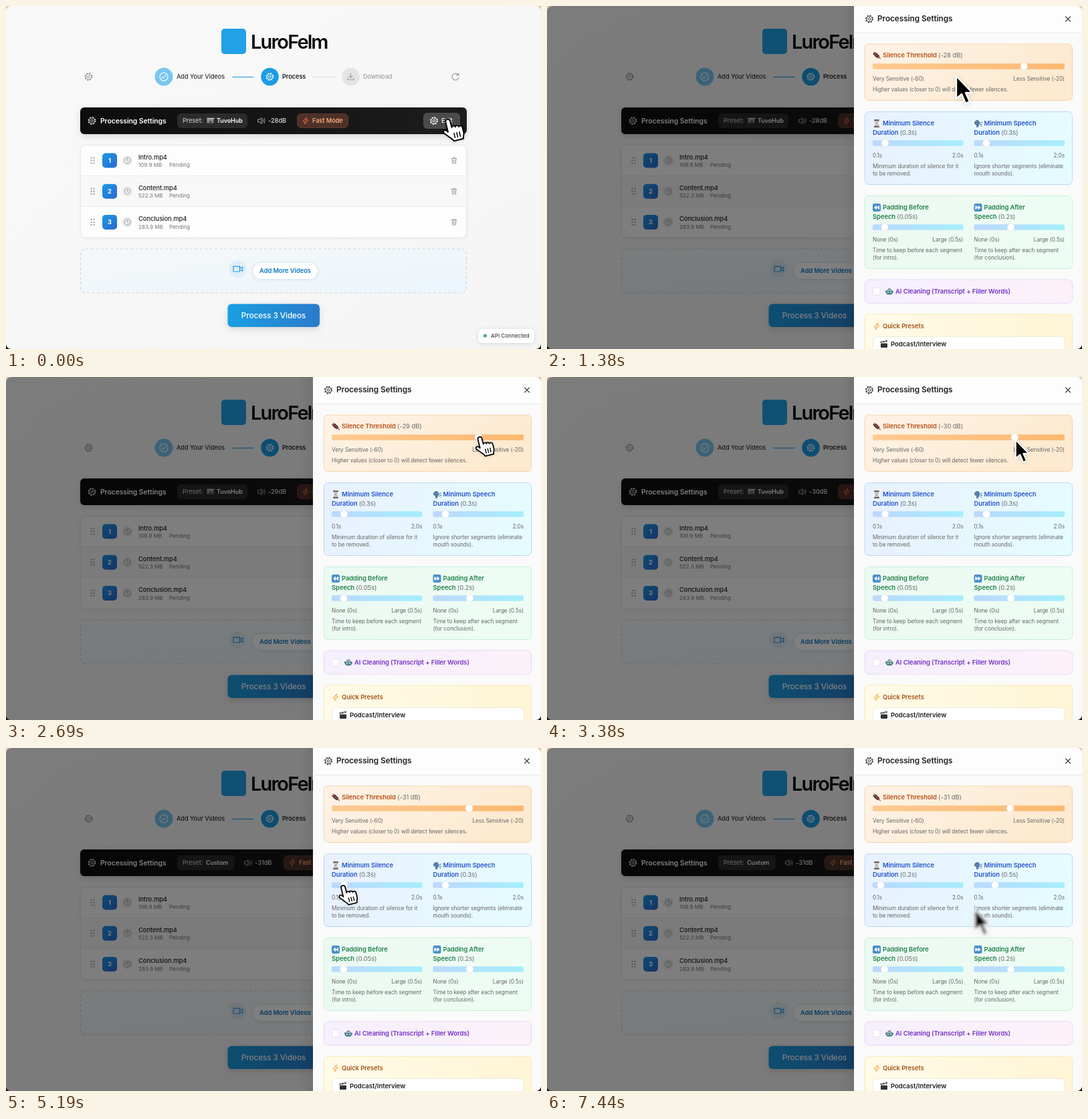
An HTML page that plays this animation: 800x514 px, repeating every 7.5 s.

```html
<!DOCTYPE html>
<html lang="en">
<head>
<meta charset="utf-8">
<title>Processing settings demo</title>
<style>
html, body { margin: 0; height: 100%; overflow: hidden; background: linear-gradient(#dfc6a4, #1b1512); }
svg { display: block; width: 800px; height: 514px; }
text { font-family: Inter, "Open Sans", sans-serif; letter-spacing: -.008em; white-space: pre; }
.brand { letter-spacing: -.065em; }
.faint { filter: drop-shadow(0 1px 2px #0001); }
.soft { filter: drop-shadow(0 1px 3px #0002); }
.lift { filter: drop-shadow(0 3px 5px #0002); }
</style>
</head>
<body>
<svg id="stage" viewBox="0 0 800 514"></svg>
<script>
const LOOP = 7500, STEP = 62.5;

// ---------- drawing helpers (text y is the visual middle of the line) ----------
const text = (x, y, size, weight, fill, str, anchor = 'start', extra = '') =>
  `<text x="${x}" y="${y + size * .36}" font-size="${size}" font-weight="${weight}" fill="${fill}" text-anchor="${anchor}" ${extra}>${str}</text>`;
const rect = (x, y, w, h, r, fill, extra = '') =>
  `<rect x="${x}" y="${y}" width="${w}" height="${h}" rx="${r}" fill="${fill}" ${extra}/>`;
const circle = (x, y, r, fill, extra = '') => `<circle cx="${x}" cy="${y}" r="${r}" fill="${fill}" ${extra}/>`;
const path = (d, stroke, width = 1, fill = 'none') =>
  `<path d="${d}" stroke="${stroke}" stroke-width="${width}" fill="${fill}" stroke-linecap="round" stroke-linejoin="round"/>`;
const at = (x, y, body, id = '') => `<g ${id && `id="${id}"`} transform="translate(${x} ${y})">${body}</g>`;
const grad = (id, a, b, x2 = 1, y2 = 0) =>
  `<linearGradient id="${id}" x2="${x2}" y2="${y2}"><stop stop-color="${a}"/><stop offset="1" stop-color="${b}"/></linearGradient>`;

// ---------- icons, centred on 0,0 ----------
const gear = c => circle(0, 0, 4.3, 'none', `stroke="${c}"`) + circle(0, 0, 1.8, 'none', `stroke="${c}"`) +
  circle(0, 0, 5.2, 'none', `stroke="${c}" stroke-width="1.5" stroke-dasharray="2.04"`);
const bolt = c => path('M1.5 -5L-4 1H-.5L-1.5 5L4 -1H.5Z', c);
const speaker = c => path('M-5 -2H-3L0 -4.5V4.5L-3 2H-5Z M2 -2Q3.5 0 2 2 M4 -3.8Q6.5 0 4 3.8', c);
const clock = circle(0, 0, 8, '#eeeeee') + circle(0, 0, 4.4, 'none', 'stroke="#9a9a9a"') + path('M0 -2.5V0L1.6 1.2', '#9a9a9a');
const trash = path('M-4 -3H4M-1.5 -3V-4.3H1.5V-3M-3 -3L-2.5 4.3H2.5L3 -3M-1 -1V2.5M1 -1V2.5', '#999', .9);
const mute = path('M-5 -2.5L-1 -4L4 1L2 4Q-3 2 -5 -2.5Z', '#4d3030', 1, '#694040') + path('M-4 -5L5.5 5', '#8f4a48', 1.1);
const hourglass = path('M-2.6 -4Q-2.6 -1 0 0Q2.6 1 2.6 4H-2.6Q-2.6 1 0 0Q2.6 -1 2.6 -4Z', '#8f8a86', .8, '#ddd0b4') +
  path('M-3.4 -5H3.4M-3.4 5H3.4', '#4e3c38', 1.4);
const talker = path('M-2 5V2Q-6 1 -5 -2Q-3 -6 1 -4L3 0L1.5 1V3H0V5Z', '#4b6a94', .8, '#5b80ad') +
  path('M4 -1L6 -2M4 1.5H6M4 3L5.5 4.5', '#4b6a94');
const skip = dir => rect(-6, -6, 12, 12, 2.5, '#4b8fc9') +
  `<path transform="scale(${dir} 1)" d="M-4 -3.2L0 0L-4 3.2ZM0 -3.2L4 0L0 3.2Z" fill="#fff"/>`;
const robot = path('M-3 -1.5Q0 -7 3 -1.5', '#65807f', 1, '#8fb0b0') + path('M-5.5 -.5H5.5Q5 4.5 2 4.5H-2Q-5 4.5 -5.5 -.5Z', '#3c737c', .8, '#4d8a93') +
  circle(-2, 1.5, .9, '#e8f4f4') + circle(2, 1.5, .9, '#e8f4f4');
const clapper = rect(-5, -1.5, 10, 6.5, 1, '#333') + path('M-4.6 -3.3L4 -5', '#333', 2) + path('M-3 -3.6L-2 -4M1 -4.4L2 -4.8', '#eee', 1.2);
const tv = path('M-5 -3H4V3H-5Z', '#777', 1, '#8d8d8d') + path('M-5 -3.5H5', '#c9c9c9', 1.5) + rect(-2, 0, 4, 4, 1, '#555');

// ---------- main page ----------
const fileRow = (name, size, i) => at(0, 231.5 + i * 46.2,
  [-4, 0, 4].map(y => circle(127.5, y, 1.1, '#999') + circle(131.5, y, 1.1, '#999')).join('') +
  rect(144, -11, 22, 22, 5, 'url(#badge)') + text(155, 0, 9.3, 700, '#fff', i + 1, 'middle') +
  at(181.5, 0, clock) + text(198, -5.2, 9.4, 500, '#222', name) +
  text(198, 6.8, 8.2, 400, '#777', size) + text(244, 6.8, 8.1, 400, '#777', 'Pending') + at(670, 0, trash));

const page = rect(0, 0, 800, 514, 0, 'url(#page)') +
  rect(322, 34, 37, 38, 5, '#20a1e8') +
  text(366, 53.5, 29, 600, '#0b0b0b', 'LuroFelm', 'start', 'class="brand"') +
  at(123.5, 106, gear('#909090')) +
  circle(236, 106, 13.5, '#78c6f0') + circle(236, 106, 6, 'none', 'stroke="#fff" stroke-width="1.1"') + path('M233.5 106.3L235.3 108L238.7 104', '#fff', 1.1) +
  text(255, 106, 9.2, 500, '#333', 'Add Your Videos') + path('M339 106.5H370', '#4fb1e6', 1.3) +
  circle(394.5, 106, 13.3, '#1b9ce3') + at(394.5, 106, gear('#fff')) + text(413, 106, 9.2, 600, '#222', 'Process') +
  path('M460 106.5H491', '#dcdcdc', 1.2) + circle(515.5, 106, 13.3, '#e4e4e6') +
  path('M515.5 101V107.5M512.8 105L515.5 107.7L518.2 105M510.7 108V110.5H520.3V108', '#a0a0a0', 1.1) +
  text(534, 106, 9.2, 500, '#a0a0a0', 'Download') +
  path('M676.4 103.5A5 5 0 1 0 677 107M676.8 100.7V103.8H673.6', '#8c8c8c', 1.1) +

  rect(111, 152, 578, 40, 6, 'url(#bar)', 'class="lift"') + at(128.5, 172, gear('#d8d8d8')) +
  text(141, 172, 10.4, 600, '#fff', 'Processing Settings') +
  rect(256, 161, 105, 22, 6, '#2b2b2b', 'id="pill"') + text(264, 172, 9.2, 500, '#c2c2c2', 'Preset:') +
  at(306, 172, tv, 'tv') + text(315, 172, 9, 600, '#fff', 'TuvoHub', 'start', 'id="preset"') +
  at(0, 0, at(382, 172, speaker('#aaa')) + text(392, 172, 9.3, 500, '#dcdcdc', '', 'start', 'id="barDb"') +
    rect(435.5, 161.5, 76, 21, 6, '#4d3129', 'stroke="#5a372d"') + at(448, 172, bolt('#f2693c')) +
    text(458, 172, 9.2, 600, '#f7a87c', 'Fast Mode'), 'barEnd') +
  rect(624, 160, 55, 24, 6, '#4b4b4b') + at(640, 172, gear('#fff')) + text(651, 172, 9.3, 500, '#fff', 'Edit') +

  rect(111.5, 208.5, 577, 138.5, 8, '#fdfdfd', 'stroke="#e9e9e9" class="faint"') + rect(112, 254.5, 576, 46, 0, '#f8f8f8') +
  path('M112 254.5H688M112 300.5H688', '#eaeaea') +
  [['Intro.mp4', '109.9 MB'], ['Content.mp4', '522.3 MB'], ['Conclusion.mp4', '283.9 MB']].map((f, i) => fileRow(...f, i)).join('') +

  rect(111.5, 364, 577, 66, 8, 'url(#drop)', 'stroke="#ccd6dc" stroke-width="1.2" stroke-dasharray="4 3.4"') +
  circle(346.5, 394, 13, '#dfeef8') + path('M340 390.2H349.5V398H340ZM349.5 393.2L353.8 391V397.2L349.5 395', '#2a9cdc', 1.2) +
  rect(368.5, 384.5, 98, 25, 12.5, '#fff', 'stroke="#dbe8f1" class="faint"') + text(417.5, 397, 9.4, 600, '#0b79c0', 'Add More Videos', 'middle') +
  rect(331.5, 446.5, 137.5, 34.5, 6, 'url(#action)', 'class="lift"') + text(400, 463.7, 11.75, 500, '#fff', 'Process 3 Videos', 'middle') +
  rect(706, 484, 84, 21, 6, '#fff', 'class="soft"') + circle(716.5, 494, 2.6, '#45b06f') + text(725, 494, 8.2, 500, '#444', 'API Connected');

// ---------- settings panel ----------
const L = 487, R = 638.5, W = 135.5;
const thumb = (x, y, id) => circle(x, y, 5.4, '#fff', `stroke="#e3e0dc" stroke-width=".6" ${id ? `id="${id}"` : ''}`);
const section = (y, h, fill, border) => rect(475.5, y, 310, h, 6, `url(#${fill})`, `stroke="${border}"`);
const small = (x, y, str, anchor) => text(x, y, 8.25, 400, '#666', str, anchor);
const heading = (x, y, color, title, id, value) =>
  text(x, y, 9.45, 600, color, `${title} <tspan font-weight="400" fill="#6b6b6b" id="${id}">${value}</tspan>`);

function control(x, y, color, icon, title, word, id, value, pos, low, high, note) {
  return at(x + 6, y, icon) + text(x + 15, y, 9.45, 600, color, title) + heading(x, y + 13.3, color, word, id, value) +
    rect(x, y + 25.2, W, 8.5, 2, 'url(#track)') + thumb(pos, y + 29.5, id + 'Thumb') +
    small(x, y + 48, low) + small(x + W, y + 48, high, 'end') +
    small(x, y + 64, note[0]) + small(x, y + 75, note[1]);
}

const panel = rect(439, 0, 20, 514, 0, 'url(#edge)') + rect(459, 0, 345, 514, 0, '#fafafa') +
  rect(459, 0, 345, 40, 0, '#fdfdfd') + path('M459 40.5H804', '#e8e8e8') +
  at(482, 19.5, gear('#333')) + text(494, 19, 11.85, 600, '#222', 'Processing Settings') + path('M775.5 16L782.5 23M782.5 16L775.5 23', '#444', 1.2) +

  section(57, 84.5, 'orange', '#f7d3a8') + at(493, 74, mute) + heading(502, 74, '#b9501a', 'Silence Threshold', 'db', '') +
  rect(L, 86.2, 287, 8.5, 2, 'url(#heat)') + thumb(713, 90.4, 'dbThumb') +
  small(L, 109, 'Very Sensitive (-60)') + small(774, 109, 'Less Sensitive (-20)', 'end') +
  small(L, 125, 'Higher values (closer to 0) will detect fewer silences.') +

  section(158.5, 109, 'blue', '#b9d7f6') +
  control(L, 176, '#2453c9', hourglass, 'Minimum Silence', 'Duration', 'sil', '', 505, '0.1s', '2.0s', ['Minimum duration of silence for it', 'to be removed.']) +
  control(R, 176, '#2453c9', talker, 'Minimum Speech', 'Duration', 'spk', '', 657, '0.1s', '2.0s', ['Ignore shorter segments (eliminate', 'mouth sounds).']) +

  section(284.5, 109, 'green', '#c6f0d5') +
  control(L, 302, '#23814a', skip(-1), 'Padding Before', 'Speech', 'before', '(0.05s)', 504.9, 'None (0s)', 'Large (0.5s)', ['Time to keep before each segment', '(for intro).']) +
  control(R, 302, '#23814a', skip(1), 'Padding After', 'Speech', 'after', '(0.2s)', 693.6, 'None (0s)', 'Large (0.5s)', ['Time to keep after each segment', '(for conclusion).']) +

  section(410, 35.5, 'purple', '#e9d6f6') + rect(487.5, 422.5, 10.5, 10.5, 2, '#fff', 'stroke="#e4e0e8"') + at(512, 427.5, robot) +
  text(521, 427.5, 9.5, 600, '#7630c4', 'AI Cleaning (Transcript + Filler Words)') +

  section(462, 80, 'yellow', '#f8eab4') + at(493, 480, bolt('#eea23c')) + text(502, 480, 9.4, 600, '#a8541c', 'Quick Presets') +
  rect(487.5, 495.5, 286.5, 40, 6, '#fff', 'stroke="#efebdd"') + at(504, 507, clapper) + text(514, 507, 9.6, 600, '#222', 'Podcast/Interview');

// ---------- pointer, hot spot at 0,0 ----------
const hand = `<g transform="rotate(-14) scale(1.1) translate(-11.5 -1)">` +
  path('M8 4.2A3.4 3.4 0 0 1 14.8 4.2V14C15 11.5 20 11.5 20 14.5C20 12 25 12.5 25 15.5C25 13.5 30 14 30 17.5V25C30 29 27.5 31 27.5 34H13C13 31 9 28.5 7 25.5L2 19.5C0 16 4 14 6 16.5L8 19Z', '#000', 1.9, '#fff') +
  path('M16 23V29.5M20 23V29.5M24 23V29.5', '#000', 1.5) + '</g>';
const arrow = path('M0 0V34L8 27L14 41L20 38L14 25H24Z', '#fff', 2.4, '#000');

const stage = document.getElementById('stage');
stage.innerHTML = '<defs>' +
  grad('page', '#f9f9f9', '#f5f5f6', 1, 1) + grad('bar', '#0d0d0d', '#1d1c1c') + grad('badge', '#1c9ae6', '#2a68cf', 1, 1) +
  grad('drop', '#f6f8f9', '#ebf5fc', 1, 1) + grad('action', '#1a9fe2', '#2a7bcb') + grad('edge', '#0000', '#0001') +
  grad('track', '#bcd8fe', '#a5eefc') + grad('heat', '#fdca92', '#fbb86f') +
  grad('orange', '#fef3e7', '#fdead0', 1, .3) + grad('blue', '#e8f1fe', '#e5fcff') +
  grad('green', '#ebf9f2', '#eefdf3') + grad('purple', '#f5effe', '#fcf1f9') + grad('yellow', '#fffbe8', '#fff5d6') +
  '<clipPath id="window"><rect width="800" height="514" rx="8"/></clipPath>' +
  '<filter id="smear" x="-60%" y="-60%" width="220%" height="220%"><feGaussianBlur id="blur" stdDeviation="0 0"/></filter></defs>' +
  `<g clip-path="url(#window)">${page}${rect(0, 0, 800, 514, 0, '#000', 'id="dim"')}${at(0, 0, panel, 'panel')}</g>` +
  `<g filter="url(#smear)"><g id="pointer" class="soft">${at(0, 0, hand, 'hand')}${at(0, 0, arrow, 'arrow')}</g></g>`;

// ---------- motion ----------
// time, x, y, scale (smaller while pressed)
const KEYS = [
  [0, 660, 170, .93], [250, 659, 170, 1], [700, 658, 170, 1], [1380, 612, 105, 1], [1650, 612, 105, 1],
  [2300, 714, 91, 1], [2450, 713, 91, .82], [2690, 708, 90, .82], [3300, 701, 94, .82], [4060, 694, 102, .82],
  [4150, 694, 102, .82], [4300, 690, 105, 1], [4950, 506, 206, 1], [5080, 506, 206, .82], [5350, 499, 207, .82],
  [5480, 499, 207, 1], [6200, 665, 207, 1], [6310, 664, 207, 1], [6430, 658, 207, .82], [6850, 671, 209, .82],
  [7000, 671, 209, 1], [7300, 671, 209, 1], [7600, 598, 280, 1]];
const HAND_TIMES = [[0, 900], [2200, 3300], [4850, 5520], [6080, 6950]];

const clamp = (v, a, b) => Math.min(b, Math.max(a, v));
const $ = id => document.getElementById(id);

function pose(t) {
  const i = Math.max(1, KEYS.findIndex(k => k[0] > t));
  const a = KEYS[i - 1], b = KEYS[i];
  const p = clamp((t - a[0]) / (b[0] - a[0]), 0, 1), e = p * p * (3 - 2 * p);
  return [1, 2, 3].map(n => a[n] + (b[n] - a[n]) * e);
}
const dragX = (t, from, to) => pose(clamp(t, from, to))[0];

function seconds(id, x, left) {
  const v = Math.round((.1 + (x - left - 5.5) / 124 * 1.9) * 10) / 10;
  $(id).textContent = `(${v.toFixed(1)}s)`;
  $(id + 'Thumb').setAttribute('cx', left + 5.5 + (v - .1) / 1.9 * 124);
}

function draw(t) {
  const open = 1 - (1 - clamp((t - 100) / 500, 0, 1)) ** 3;
  $('panel').setAttribute('transform', `translate(${380 * (1 - open)} 0)`);
  $('dim').setAttribute('opacity', .5 * open);

  const db = Math.round(-60 + (dragX(t, 2450, 4150) - 492.5) / 6.9);
  $('db').textContent = `(${db} dB)`;
  $('barDb').textContent = db + 'dB';
  $('dbThumb').setAttribute('cx', 492.5 + (db + 60) * 6.9);
  seconds('sil', dragX(t, 5080, 5350), L);
  seconds('spk', dragX(t, 6430, 6850), R);

  const custom = t >= 4180;
  $('preset').textContent = custom ? 'Custom' : 'TuvoHub';
  $('preset').setAttribute('x', custom ? 299 : 315);
  $('pill').setAttribute('width', custom ? 86 : 105);
  $('tv').setAttribute('opacity', custom ? 0 : 1);
  $('barEnd').setAttribute('transform', `translate(${custom ? -20 : 0} 0)`);

  const [x, y, s] = pose(t), [px, py] = pose(Math.max(0, t - 16));
  $('pointer').setAttribute('transform', `translate(${x} ${y}) scale(${s})`);
  const smear = d => clamp(Math.abs(d) * .35, 0, 3.5);
  $('blur').setAttribute('stdDeviation', `${smear(x - px)} ${smear(y - py)}`);
  const pointing = HAND_TIMES.some(([a, b]) => t >= a && t < b);
  $('hand').setAttribute('opacity', pointing ? 1 : 0);
  $('arrow').setAttribute('opacity', pointing ? 0 : 1);
}

const start = performance.now();
function tick() {
  const t = (performance.now() - start) % LOOP;
  draw(Math.floor((t + 3) / STEP) * STEP % LOOP);
  requestAnimationFrame(tick);
}
tick();
</script>
</body>
</html>
```
